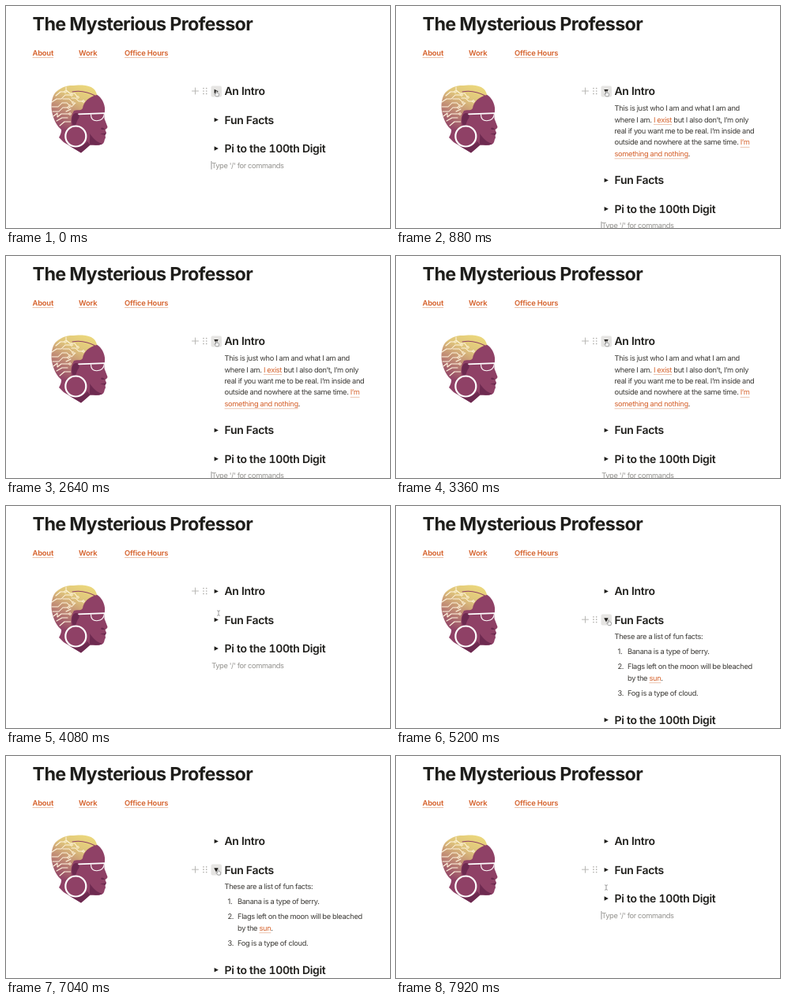
Write an HTML page that moves like this. It is 486 by 282 pixels and loops after 8 s.

```html
<!DOCTYPE html>
<html lang="en">
<head>
<meta charset="utf-8">
<title>Toggle lists</title>
<style>
html, body { margin: 0; width: 100%; height: 100%; overflow: hidden; background: #fff; }
svg { display: block; width: 486px; height: 282px; }
text { font-family: Inter, Roboto, sans-serif; text-rendering: geometricPrecision; white-space: pre; }
.title { font-size: 23.4px; font-weight: 700; letter-spacing: -.031em; fill: #1f1e1b; }
.head { font-size: 14px; font-weight: 600; letter-spacing: -.023em; fill: #1f1e1b; font-variant-numeric: tabular-nums; }
.body { font-size: 9.3px; letter-spacing: -.038em; fill: #3d3b37; }
.nav { font-size: 9.4px; font-weight: 600; letter-spacing: -.018em; }
.hint { fill: #93928e; letter-spacing: -.04em; }
.link { fill: #d5602a; }
.under { stroke: #e9b79c; stroke-width: .8; }
.line { fill: none; stroke-linecap: round; stroke-linejoin: round; }
</style>
</head>
<body>
<svg viewBox="0 0 486 282">
  <defs>
    <linearGradient id="hairTone" gradientUnits="userSpaceOnUse" x1="99" y1="101" x2="72" y2="158">
      <stop offset="0" stop-color="#ead67c"/>
      <stop offset=".3" stop-color="#dfc47c"/>
      <stop offset=".65" stop-color="#bd8574"/>
      <stop offset="1" stop-color="#8f4065"/>
    </linearGradient>
    <path id="hair" d="M115 113 C114 107 110 103 103 101.500 C94 99.500 87 101.500 81 101 C73 102 65 106 61 112
      C57 119 56.500 130 59 138 C61 146 65 153 70 157 L83 156 C82 148 82 139 86 133 C90 131 94 134 97 130 C98 122 105 115 115 113Z"/>
    <clipPath id="hairClip"><use href="#hair"/></clipPath>
  </defs>

  <g id="nav">
    <text class="nav link" x="33.500" y="62.500">About</text>
    <text class="nav link" x="92" y="62.500">Work</text>
    <text class="nav link" x="150" y="62.500">Office Hours</text>
  </g>
  <text class="title" x="33.500" y="30.700">The Mysterious Professor</text>

  <g id="portrait">
    <path fill="#8f4166" d="M113 111.500 C119 114 124 121 125 129 C125.500 135 124 139 124.500 143 L128.500 153.500
      C128.500 155.500 126.500 156.500 125.500 157 L127 161 L125.500 164 L126 167.500 C124 170 125 173 122.500 175
      C119 177.500 113 176.500 106.500 176.500 L95 186.500 L73 173 L67 167 C70 162 71 157 69 152 L80 128 L100 114Z"/>
    <path fill="#6d2a50" d="M106.500 176.500 C105 172 107 168 106 162 C110 168 115 173 122 175.300 C117 177.500 111 176.500 106.500 176.500Z
      M95 186.500 L80 177.500 C88 181 97 179 103 172 L106.500 176.500Z
      M119 162.500 L127 161 L125.500 164Z M120 155 C122 153.500 124 155 125.500 157 L121 157Z"/>
    <use href="#hair" fill="url(#hairTone)"/>
    <g clip-path="url(#hairClip)">
      <path class="line" stroke="#fff6df" stroke-width="1.050" d="M58 122 L64 118 H70 L75 113 H82
        M57 128 H66 L71 123 H77 L80 126 M59 134 H67 L72 129 H78 M60 140 L65 136 V141 L70 137 H80 M64 146 L71 142 H78
        M68 152 L74 147 H82 M63 114 L69 109 H74 M76 103 V107 L81 111 H87 L90 115 M72 118 H80 L84 122
        M83 117 H88 L92 121 H97 M83 128 L88 123 M76 134 L82 131"/>
      <g id="nodes" fill="none" stroke="#fff6df" stroke-width=".9"></g>
      <path class="line" stroke="#8f4166" stroke-width="1.100" d="M84 109 C94 107 104 109 115 115"/>
    </g>
    <path fill="#6d2a50" d="M84 150 C82 143 84 136 89 136 C93 136 94 141 91 144 C89 147 89 151 87 153Z"/>
    <path class="line" stroke="#fff" stroke-width="1.700" d="M92 137.300 L125.500 136.200"/>
    <path class="line" stroke="#fff" stroke-width="1.100" d="M107.500 138 C107.500 143 110 146 115 145.800 C120 145.500 124 143 124.500 136.500"/>
    <circle cx="88.300" cy="165.500" r="13" fill="none" stroke="#fff" stroke-width="2.200"/>
  </g>

  <rect id="hover" x="259.500" width="13.500" height="14" rx="2" fill="#e6e5e3"/>
  <g id="handle">
    <path class="line" stroke="#b9b8b5" stroke-width="1" d="M235.500 0 H243.500 M239.500 -4 V4"/>
    <g id="grip" fill="#b3b2af"></g>
  </g>

  <text class="head" x="276.500" y="113.300">An Intro</text>
  <g id="introBody">
    <text class="body" x="276.500" y="133">This is just who I am and what I am and</text>
    <text class="body" x="276.500" y="147.500">where I am. <tspan class="link">I exist</tspan> but I also don’t, I’m only</text>
    <text class="body" x="276.500" y="162">real if you want me to be real. I’m inside and</text>
    <text class="body" x="276.500" y="176.400">outside and nowhere at the same time. <tspan class="link">I’m</tspan></text>
    <text class="body" x="276.500" y="190.800"><tspan class="link">something and nothing</tspan>.</text>
  </g>

  <g id="facts">
    <text class="head" x="276.500" y="149.500">Fun Facts</text>
    <g id="factsBody">
      <text class="body" x="276.500" y="169">These are a list of fun facts:</text>
      <text class="body" x="280.500" y="188.200">1.</text>
      <text class="body" x="293" y="188.200">Banana is a type of berry.</text>
      <text class="body" x="280.500" y="207.200">2.</text>
      <text class="body" x="293" y="207.200">Flags left on the moon will be bleached</text>
      <text class="body" x="293" y="221.600">by the <tspan class="link">sun</tspan>.</text>
      <text class="body" x="280.500" y="240.800">3.</text>
      <text class="body" x="293" y="240.800">Fog is a type of cloud.</text>
    </g>
  </g>

  <g id="digits">
    <text class="head" x="276.500" y="186">Pi to the 100th Digit</text>
    <text class="body hint" x="260.200" y="205.700">Type '/' for commands</text>
    <path id="caret" stroke="#777" stroke-width=".8" d="M260 197 V207.500"/>
  </g>

  <g id="arrows" fill="#1f1e1b"></g>

  <path id="hand" fill="#fafafa" stroke="#707070" stroke-width=".6" stroke-linejoin="round"
    d="M-1 -3.500 C-.4 -4.200 .3 -3.800 .4 -3 V-1.200 L2.300 -.8 C3 -.6 3.200 0 3 .8 L2.500 3.300 H-.7 L-2.700 .7 C-2.800 0 -2 -.2 -1 .6Z"/>
  <path id="beam" class="line" stroke="#858585" stroke-width=".8"
    d="M-1.500 -3.200 Q0 -3.200 0 -2.300 Q0 -3.200 1.500 -3.200 M0 -2.300 V2.300 M-1.500 3.200 Q0 3.200 0 2.300 Q0 3.200 1.500 3.200"/>
</svg>
<script>
const LOOP = 8000;
const INTRO = { open: 400, close: 3760, height: 76.8 };
const FACTS = { open: 4640, close: 7520, height: 90.8 };
const TURN = 160;
const ROWS = [108.4, 144.6, 181];
const PATH = [
  [0, 266.5, 111.5], [3800, 266.5, 111.5], [4080, 269, 136],
  [4320, 269.5, 148.3], [6400, 269.5, 148.3], [6900, 268.7, 147.8],
  [7600, 268.7, 147.8], [7920, 266, 167], [8000, 266, 169]
];

const $ = id => document.getElementById(id);
const add = (parent, tag, attrs) => {
  const el = document.createElementNS("http://www.w3.org/2000/svg", tag);
  for (const key in attrs) el.setAttribute(key, attrs[key]);
  return parent.appendChild(el);
};
const move = (el, x, y, turn = 0) =>
  el.setAttribute("transform", `translate(${x} ${y}) rotate(${turn})`);
const show = (el, on) => el.setAttribute("visibility", on ? "visible" : "hidden");
const clamp = v => Math.min(1, Math.max(0, v));
const ease = v => v * v * (3 - 2 * v);

for (let i = 0; i < 6; i++)
  add($("grip"), "circle", { cx: 250 + (i % 2) * 3.7, cy: (i >> 1) * 3.4 - 3.4, r: .85 });

for (const [cx, cy] of [[83, 113], [81, 127], [79, 129], [81, 137], [75, 109], [91, 116], [98, 121], [85, 123]])
  add($("nodes"), "circle", { cx, cy, r: 1.3 });

// Pale underlines follow the laid-out width of each link.
for (const link of document.querySelectorAll(".link")) {
  const { x, y } = link.getStartPositionOfChar(0);
  const end = link.getEndPositionOfChar(link.getNumberOfChars() - 1).x;
  add(link.closest("g"), "path", { class: "under", d: `M${x} ${y + 3} H${end}` });
}

const arrows = ROWS.map(() => add($("arrows"), "path", { d: "M-2.400 -2.700 L2.900 0 L-2.400 2.700Z" }));

const isOpen = (item, t) => t >= item.open && t < item.close;
const angle = (item, t) =>
  90 * (ease(clamp((t - item.open) / TURN)) - ease(clamp((t - item.close) / TURN)));

function pointer(t) {
  let i = 1;
  while (i < PATH.length - 1 && PATH[i][0] < t) i++;
  const [t0, x0, y0] = PATH[i - 1], [t1, x1, y1] = PATH[i];
  const k = clamp((t - t0) / (t1 - t0));
  return [x0 + (x1 - x0) * k, y0 + (y1 - y0) * k];
}

function draw(t) {
  const intro = isOpen(INTRO, t), facts = isOpen(FACTS, t);
  const introShift = intro ? INTRO.height : 0;
  const digitsShift = introShift + (facts ? FACTS.height : 0);
  show($("introBody"), intro);
  show($("factsBody"), facts);
  move($("facts"), 0, introShift);
  move($("digits"), 0, digitsShift);
  show($("caret"), (t + 440) % 1000 < 500);

  move(arrows[0], 266, ROWS[0], angle(INTRO, t));
  move(arrows[1], 266, ROWS[1] + introShift, angle(FACTS, t));
  move(arrows[2], 266, ROWS[2] + digitsShift);

  const [x, y] = pointer(t);
  const row = ROWS[y > 137 ? 1 : 0];
  const over = Math.abs(y - row) < 7.5;
  move($("handle"), 0, row - .4);
  $("hover").setAttribute("y", row - 7);
  show($("hover"), over);
  show($("hand"), over);
  show($("beam"), !over);
  move($("hand"), x, y);
  move($("beam"), x, y);
}

function tick() {
  draw(performance.now() % LOOP);
  requestAnimationFrame(tick);
}
tick();
</script>
</body>
</html>
```
